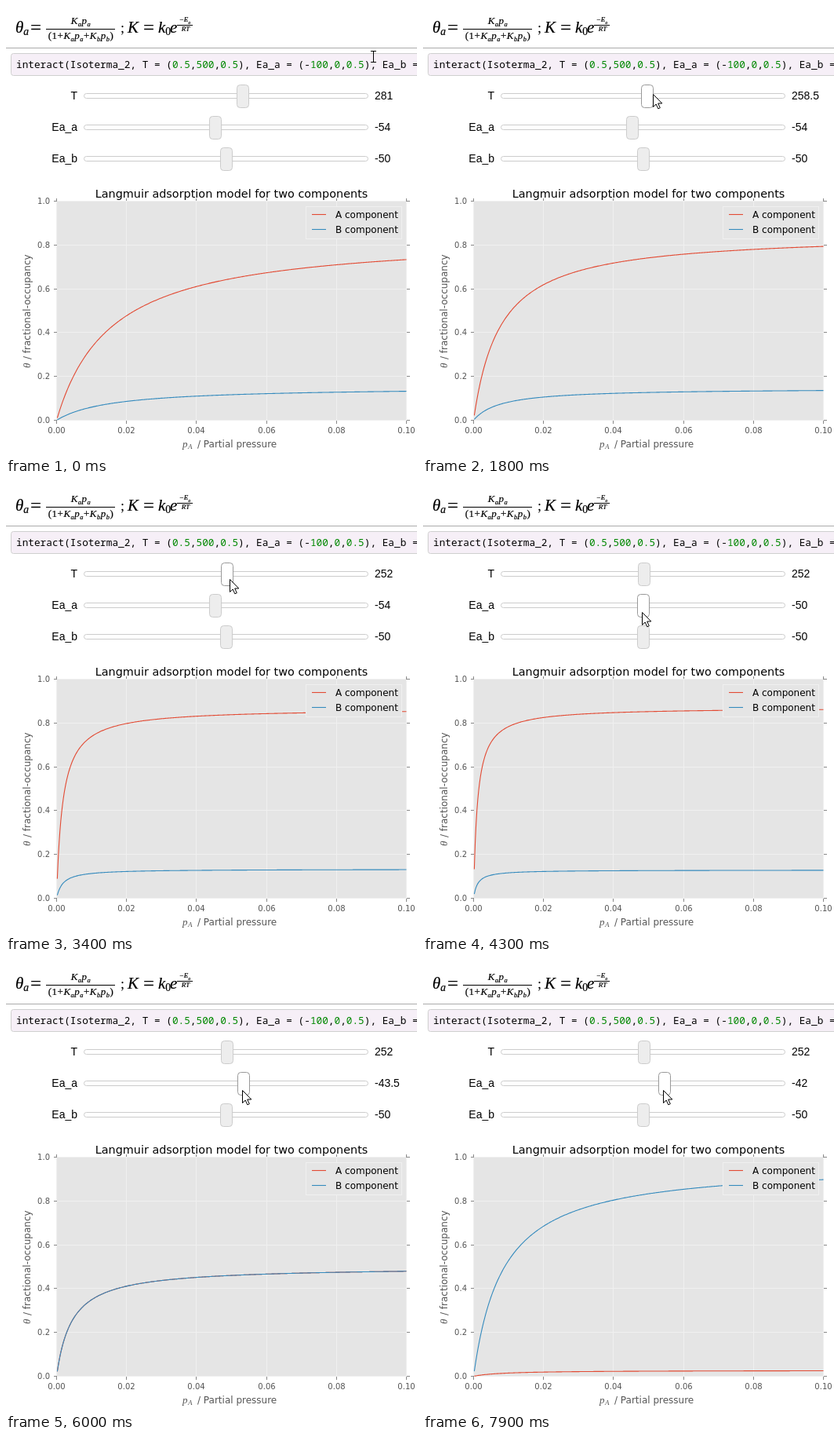
Animation, 524 px wide and 573 px high, one loop 8000 ms. Source, as an HTML page:

```html
<!DOCTYPE html>
<html lang="en">
<head>
<meta charset="utf-8">
<title>Langmuir adsorption</title>
<style>
html, body { margin: 0; width: 100%; height: 100%; overflow: hidden; background: #fff; }
svg { display: block; width: 524px; height: 573px; }
.math { font: italic 21px "Liberation Serif", serif; stroke: #000; stroke-width: .2px; }
.math .small { font-size: 13px; letter-spacing: .5px; }
.math .tiny { font-size: 9px; }
.math .sub { font-size: 65%; baseline-shift: -3px; }
.up { font-style: normal; }
.code { font: 12.75px "Noto Sans Mono", monospace; white-space: pre; }
.code tspan { fill: #080; }
.ui { font: 14px "Liberation Sans", Arial, sans-serif; }
.plot { font: 12px "DejaVu Sans", sans-serif; fill: #555; }
.tick { font-size: 10px; }
.title { font-size: 14.4px; fill: #000; }
.sym { font: italic 13px "Liberation Serif", serif; }
.end { text-anchor: end; }
.mid { text-anchor: middle; }
.track { fill: #fff; stroke: #ccc; }
.thumb { fill: #ededed; stroke: #ccc; }
.thumb.on { fill: #fff; stroke: #999; }
.curve { fill: none; stroke-width: 1.1; }
.a { stroke: #e24a33; }
.b { stroke: #348abd; }
</style>
</head>
<body>
<svg viewBox="0 0 524 573">
  <g class="math">
    <text x="12" y="34">θ<tspan class="sub">a</tspan></text>
    <text class="up" x="31" y="36" font-size="25">=</text>
    <text class="small mid" x="95.500" y="23">K<tspan class="sub">a</tspan>p<tspan class="sub">a</tspan></text>
    <text class="small mid" x="95.500" y="42"><tspan class="up">(1+</tspan>K<tspan class="sub">a</tspan>p<tspan class="sub">a</tspan><tspan class="up">+</tspan>K<tspan class="sub">b</tspan>p<tspan class="sub">b</tspan><tspan class="up">)</tspan></text>
    <text class="up" x="146" y="34" font-size="18" stroke="none">;</text>
    <text x="155" y="34">K</text>
    <text class="up" x="175" y="36" font-size="25">=</text>
    <text x="194" y="34">k<tspan class="sub up">0</tspan></text>
    <text x="209" y="34">e</text>
    <text class="tiny mid" x="228" y="20">−E<tspan class="sub">a</tspan></text>
    <text class="tiny mid" x="229" y="32">RT</text>
    <path d="M51 29.5H139M218 24.5H238" stroke-width="1"/>
  </g>
  <path d="M0 53.5H524" stroke="#aaa"/>
  <rect x="6.5" y="60.5" width="540" height="28" rx="3" fill="#f6eff7" stroke="#cfcfcf"/>
  <text class="code" x="13" y="79">interact(Isoterma_2, T = (<tspan>0.5</tspan>,<tspan>500</tspan>,<tspan>0.5</tspan>), Ea_a = (-<tspan>100</tspan>,<tspan>0</tspan>,<tspan>0.5</tspan>), Ea_b =</text>
  <g class="ui" id="sliders"></g>
  <g class="plot">
    <text class="title mid" x="287.5" y="244">Langmuir adsorption model for two components</text>
    <rect x="64.5" y="249" width="446" height="279" fill="#e5e5e5"/>
    <g id="axes"></g>
    <path class="curve a" id="curveA"/>
    <path class="curve b" id="curveB"/>
    <rect x="382.5" y="255.5" width="122" height="41" fill="#e5e5e5" stroke="#f0f0f0"/>
    <path class="curve a" d="M390 265.5H408"/>
    <path class="curve b" d="M390 284.5H408"/>
    <text x="420" y="270" fill="#000">A component</text>
    <text x="420" y="289" fill="#000">B component</text>
    <text class="sym" x="225" y="562">p</text>
    <text class="sym" x="232" y="564" style="font-size:9px">A</text>
    <text x="244" y="562">/ Partial pressure</text>
    <g transform="translate(31 461) rotate(-90)">
      <text class="sym">θ</text>
      <text x="11">/ fractional-occupancy</text>
    </g>
  </g>
  <path id="beam" d="M465 57.5H472M468.500 58V71M465 71.500H472" stroke="#000"/>
  <path id="arrow" d="M.5 .5V16.500L4.200 13L6.800 18.800L9.300 17.700L6.700 12H11.800Z" fill="#fff" stroke="#000"/>
</svg>
<script>
const $ = id => document.getElementById(id);
const half = v => Math.round(v * 2) / 2;
const mix = (a, b, u) => a + (b - a) * u;
// Progress from 0 to 1 between two times
const ramp = (t, t0, t1) => Math.min(1, Math.max(0, (t - t0) / (t1 - t0)));

function add(parent, tag, attrs, text = '') {
  const el = document.createElementNS('http://www.w3.org/2000/svg', tag);
  for (const k in attrs) el.setAttribute(k, attrs[k]);
  el.textContent = text;
  return parent.appendChild(el);
}

function slider(label, y, min, max) {
  const g = $('sliders');
  add(g, 'text', { x: 91, y: y + 4, class: 'end' }, label);
  add(g, 'rect', { class: 'track', x: 99.5, y: y - 3, width: 362, height: 6, rx: 3 });
  const thumb = add(g, 'rect', { y: y - 14, width: 15, height: 29, rx: 4 });
  const value = add(g, 'text', { x: 470, y: y + 4 });
  return (v, on) => {
    const x = Math.floor(108.2 + 346 * (v - min) / (max - min));
    thumb.setAttribute('x', x - 7.5);
    thumb.setAttribute('class', on ? 'thumb on' : 'thumb');
    value.textContent = v;
    return x;
  };
}
const setT = slider('T', 114.5, 0.5, 500);
const setA = slider('Ea_a', 154.5, -100, 0);
slider('Ea_b', 194.5, -100, 0)(-50, false);

const px = p => 64.5 + p * 4460;
const py = q => 527.5 - q * 279;
for (let i = 0; i <= 5; i++) {
  const x = Math.floor(px(i / 50)) + 0.5, y = Math.floor(py(i / 5)) + 0.5, axes = $('axes');
  add(axes, 'path', { d: `M${x} 249V528M65 ${y}H511`, stroke: '#f0f0f0' });
  add(axes, 'path', { d: `M${x} 245v4m0 279v4M61 ${y}h4m446 0h4`, stroke: '#888' });
  add(axes, 'text', { class: 'tick mid', x, y: 544 }, (i / 50).toFixed(2));
  add(axes, 'text', { class: 'tick end', x: 56, y: y + 3.5 }, (i / 5).toFixed(1));
}

// Two-component Langmuir isotherm, energies in kJ/mol
const K = (e, T) => 5e-9 * Math.exp(-e * 1000 / (8.314 * T));
function drawPlot(T, e) {
  const ka = K(e, T), kb = K(-50, T);
  const line = k => {
    const pts = [];
    for (let i = 0; i <= 400; i++) {
      const p = mix(0.0002, 0.1, i / 400);
      pts.push(px(p).toFixed(2) + ' ' + py(k * p / (1 + (ka + kb) * p)).toFixed(2));
    }
    return 'M' + pts.join('L');
  };
  $('curveA').setAttribute('d', line(ka));
  $('curveB').setAttribute('d', line(kb));
}

const sliderT = t => half(mix(281, 252, ramp(t, 500, 2180)));
const sliderA = t => half(-54 + 4 * ramp(t, 3900, 4300) + 9 * ramp(t, 4400, 6600) - ramp(t, 7700, 7900));

// The plot redraws at intervals and trails behind the sliders
const tick = (t, period, start = 0) => start + Math.floor((t - start) / period) * period;
const plotT = t => half(mix(281, 252, ramp(tick(t, 400, 100), 400, 3700) ** 1.3));
const plotA = t => half(-54 + 12 / (1 + Math.exp((6280 - tick(Math.min(t, 7500), 375)) / 404)));

function pointer(t, xT, xA) {
  const enter = 1 - (1 - ramp(t, 0, 400)) ** 1.5;
  const down = ramp(t, 3300, 3900);
  return [
    mix(mix(468, xT + 7, enter), xA - 2, down),
    mix(mix(64, 112, enter), 163, down)
  ].map(Math.round);
}

let last = -1;
function frame() {
  const t = Math.floor(performance.now() % 8000 / 100) * 100;
  if (t !== last) {
    last = t;
    const xT = setT(sliderT(t), t >= 400 && t < 3700);
    const xA = setA(sliderA(t), t >= 3800);
    drawPlot(plotT(t), plotA(t));
    $('arrow').setAttribute('transform', `translate(${pointer(t, xT, xA)})`);
    $('arrow').style.display = t ? '' : 'none';
    $('beam').style.display = t ? 'none' : '';
  }
  requestAnimationFrame(frame);
}
frame();
</script>
</body>
</html>
```
